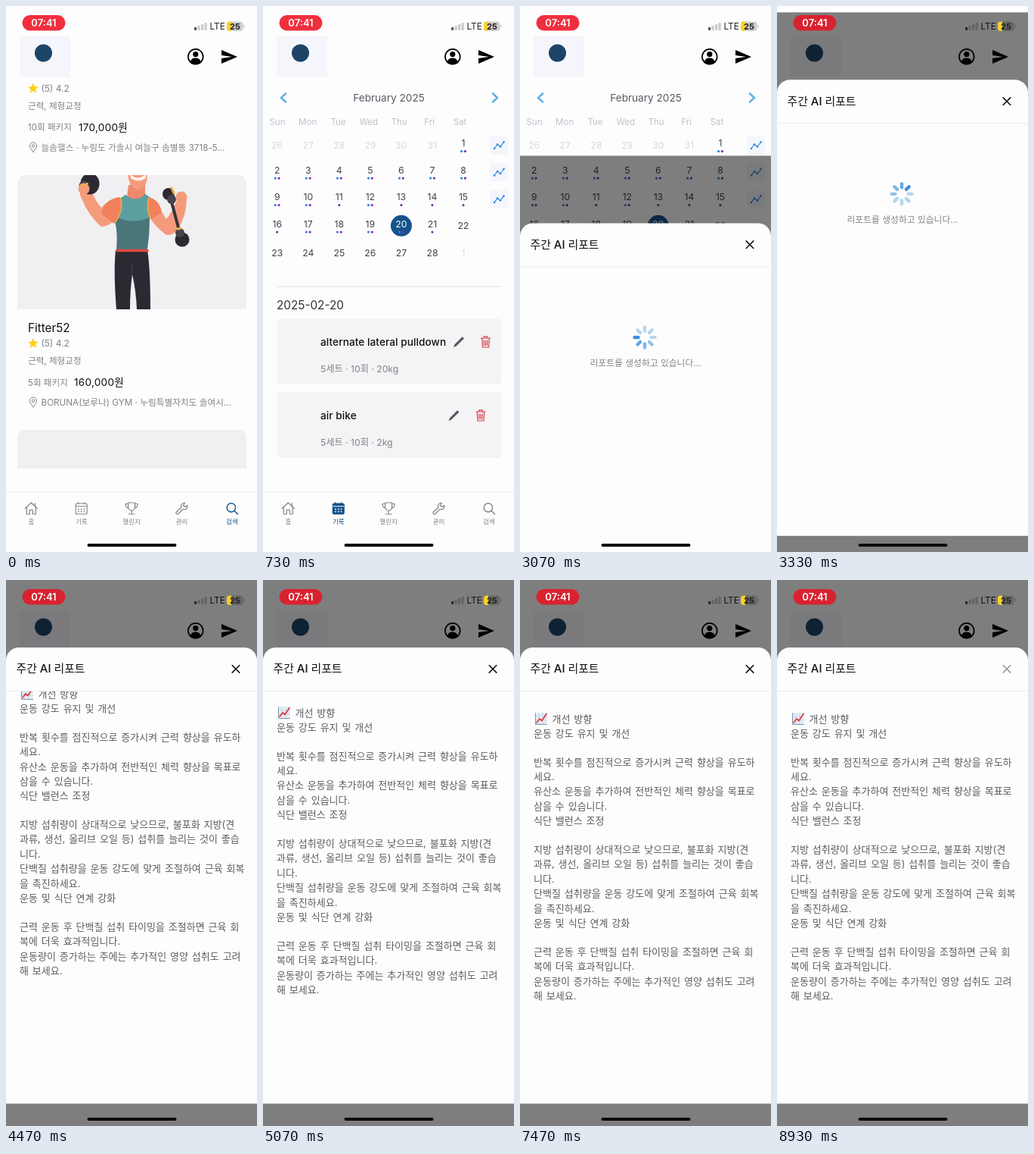
Recreate the animation shown at these times as an HTML page. Size 332 by 720 pixels, loop 9 s.

```html
<!DOCTYPE html>
<html lang="ko">
<head>
<meta charset="utf-8">
<style>
html, body { margin: 0; width: 100%; height: 100%; overflow: hidden; background: #fefdfe; }
svg { display: block; width: 332px; height: 720px; }
text { font-family: Inter, "Noto Sans CJK KR", "Noto Sans CJK", sans-serif; white-space: pre; }
.line { fill: none; stroke-linecap: round; stroke-linejoin: round; }
</style>
</head>
<body>
<svg id="stage" viewBox="0 0 332 720"></svg>
<script>
const stage = document.getElementById('stage');
const BLACK = '#111', GREY = '#828286', NAVY = '#14538c', BLUE = '#2b86d9', PURPLE = '#7b32a8';

// Text is placed by the vertical centre of its capitals.
const text = (x, cy, size, str, fill = BLACK, more = '') =>
  `<text x="${x}" y="${(cy + size * 0.36).toFixed(2)}" font-size="${size}" fill="${fill}" ${more}>${str}</text>`;
const mid = (x, cy, size, str, fill, more = '') => text(x, cy, size, str, fill, `text-anchor="middle" ${more}`);
const rect = (x, y, w, h, fill, r = 0) => `<rect x="${x}" y="${y}" width="${w}" height="${h}" rx="${r}" fill="${fill}"/>`;
const dot = (x, y, r, fill) => `<circle cx="${x}" cy="${y}" r="${r}" fill="${fill}"/>`;
const shape = (d, fill) => `<path d="${d}" fill="${fill}"/>`;
const line = (d, stroke, w = 1) => `<path class="line" d="${d}" stroke="${stroke}" stroke-width="${w}"/>`;
const at = (x, y, body) => `<g transform="translate(${x} ${y})">${body}</g>`;
const group = (id, body) => `<g id="${id}">${body}</g>`;
// Rectangle with only its top corners rounded.
const topRounded = (x, y, w, h, r, fill) =>
  shape(`M${x} ${y + h}V${y + r}a${r} ${r} 0 0 1 ${r} ${-r}h${w - 2 * r}a${r} ${r} 0 0 1 ${r} ${r}V${y + h}z`, fill);

function header() {
  const bars = [0, 1, 2, 3].map(i => rect(249 + i * 4.5, 28 - i * 2, 3.2, 4 + i * 2, i ? '#cbcacc' : '#555', 0.8)).join('');
  return bars + text(269.5, 27, 11.8, 'LTE', '#222') +
    rect(292, 20.5, 21.5, 12.5, '#cfcdca', 4) + rect(314.3, 24.5, 1.4, 4.5, '#cfcdca', 0.7) +
    rect(18, 40, 67, 54, '#f5f6fb', 2) + dot(49.5, 62, 11.5, '#1d4467') +
    `<circle cx="250.8" cy="66.8" r="9.9" fill="none" stroke="#000" stroke-width="1.7"/>` +
    dot(250.8, 63.6, 3.6, '#000') + shape('M244 73.5q1-5 6.8-5t6.8 5q-2.5 3-6.8 3t-6.8-3z', '#000') +
    shape('M285 58L306 67L285 76L285 69L299 67L285 65z', '#000');
}

const pin = line('M0 6C-3 2-4.6.4-4.6-2a4.6 4.6 0 0 1 9.2 0C4.6.4 3 2 0 6z', GREY) +
  `<circle cy="-2" r="1.7" fill="none" stroke="${GREY}"/>`;
const star = shape('M0-7L2-2.2 7-2 3.1 1.4 4.4 6.2 0 3.5-4.4 6.2-3.1 1.4-7-2-2-2.2z', '#fbd018');

function trainerInfo(y, pack, price, priceX, place) {
  return at(36, y, star) + text(46.5, y, 12, '(5) 4.2', GREY) +
    text(29, y + 23.3, 11.6, '근력, 체형교정', GREY) +
    text(29, y + 51.7, 11.6, pack, GREY) + text(priceX, y + 51.7, 13.6, price, BLACK, 'letter-spacing=".25"') +
    at(36, y + 78, pin) + text(46.5, y + 78.5, 11.7, place, GREY);
}

function athlete() {
  const skin = '#f59b7c', dark = '#2d2932', light = '#48434d', sleeve = '#f2805c', gold = '#e9b23f';
  return shape('M145 322H187Q191 345 191 400H173Q172 375 167 354 164 375 164 400H146Q142 350 145 322z', dark) +
    line('M167 340L166 352', light, 1.2) +
    shape('M98 241L112 241Q116 254 126 266Q134 256 150 252L152 270Q142 290 126 291Q108 276 98 249z', skin) +
    shape('M187 253Q203 256 205 270L212 281Q221 270 226 256L238 250Q241 270 229 292Q222 303 212 302Q196 290 188 276z', skin) +
    `<ellipse cx="111" cy="234.5" rx="12.5" ry="14" fill="${dark}"/>` + dot(103, 237, 6.5, light) +
    dot(103, 241, 7.5, skin) + line('M99 237L108 234', gold, 2) +
    shape('M162 236H184V252Q173 262 160 252z', '#ee8a6c') +
    shape('M161 221H187Q187 240 176 242Q163 242 161 221z', skin) +
    shape('M164 222Q174 231 185 222V227Q175 234 165 227z', '#fff3ef') +
    shape('M158 249Q172 261 184 248L191 253Q187 266 190 282Q190 302 187 321H146Q148 298 144 284Q155 269 150 255z', '#4a757b') +
    shape('M158 249Q172 261 184 248L191 253Q186 266 190 279Q168 288 148 279Q155 266 150 255z', '#5c9fa1') +
    shape('M151 252Q130 254 126 274L143 287Q156 268 151 252z', sleeve) +
    shape('M189 252Q204 256 206 273L191 281Q184 266 189 252z', sleeve) +
    line('M151 253Q157 268 144 286', gold, 1.5) + line('M189 253Q185 266 191 280', gold, 1.5) +
    line('M147 322.5H187', '#e2483d', 3.5) +
    line('M217 251L232 307', '#37333d', 4) + dot(215, 248, 8, dark) + dot(219, 255, 6, light) +
    dot(233, 308, 9.5, dark) + dot(230, 299, 6, light) + line('M219 240L222 247', gold, 3) +
    line('M227 294L231 293', gold, 3) + dot(232, 252, 7.5, skin);
}

function searchPage() {
  return trainerInfo(108.5, '10회 패키지', '170,000원', 96, '늘솜헬스 · 누림도 가솔시 여늘구 솜별동 3718-5...') +
    topRounded(15, 223, 303, 177, 10, '#f0eff2') +
    `<g clip-path="url(#photo)">${athlete()}</g>` +
    text(29, 424, 15.3, 'Fitter52') +
    trainerInfo(444.7, '5회 패키지', '160,000원', 90, 'BORUNA(보루나) GYM · 누림특별자치도 솔여시...') +
    topRounded(15, 559, 303, 51, 10, '#f0eff2');
}

function monthGrid() {
  const single = [11, 13, 14, 15, 16, 21];
  let out = '';
  for (let i = 0; i < 35; i++) {
    const day = i - 5, x = 18.7 + (i % 7) * 41.05, y = 183.3 + Math.floor(i / 7) * 35.5;
    const inside = day > 0 && day < 29, marked = inside && day < 22, today = day === 20;
    const label = day < 1 ? day + 31 : day > 28 ? day - 28 : day;
    if (today) out += dot(x, y, 14, NAVY);
    out += mid(x, y - (marked ? 2.4 : 0), 12.2, label, today ? '#fff' : inside ? '#3c4046' : '#d6d8dc');
    if (marked && single.includes(day)) out += dot(x, y + 8.3, 1.6, PURPLE);
    else if (marked) out += dot(x - 2.4, y + 8.3, 1.6, BLUE) + dot(x + 2.4, y + 8.3, 1.6, PURPLE);
  }
  return out;
}

const pencil = shape('M-7 7L-5.6 3.4 4.6-6.8 7-4.6-3.4 5.6z', '#57575b');
const trash = line('M-6-5H6M-2.3-5V-7.2H2.3V-5M-4.8-4.6L-4 7H4L4.8-4.6M0-2V4.5M-2.3-2L-2 4.5M2.3-2L2 4.5', '#d23a45', 1.15);

function exercise(y, name, sets, iconX) {
  return rect(18.5, y, 296.5, 87, '#f4f3f6', 5) +
    text(76, y + 31, 13.6, name, BLACK, 'font-weight="500" letter-spacing=".08"') +
    text(76, y + 67, 12.2, sets, GREY) + at(iconX, y + 31, pencil) + at(iconX + 35.5, y + 31, trash);
}

function recordPage() {
  const days = ['Sun', 'Mon', 'Tue', 'Wed', 'Thu', 'Fri', 'Sat'];
  const trend = rect(-12, -12, 24, 24, '#f3f6fc', 4) + line('M-6 4.5L-2-1 2 2 6.5-4', BLUE, 1.2) +
    [[-6, 4.5], [-2, -1], [2, 2], [6.5, -4]].map(p => dot(...p, 1.3, BLUE)).join('');
  return line('M30 115.5L24 121L30 126.5', '#62b2e4', 2.6) + line('M304 115.5L310 121L304 126.5', '#62b2e4', 2.6) +
    mid(166.5, 121, 13.6, 'February 2025', '#555a61') +
    days.map((d, i) => mid(19 + i * 40.25, 152.5, 11.6, d, '#bcc3cc')).join('') +
    monthGrid() + [183.5, 219, 254.5].map(y => at(312, y, trend)).join('') +
    rect(18, 369.5, 297, 1, '#dededf') + text(18, 394, 15.3, '2025-02-20', '#333') +
    exercise(412, 'alternate lateral pulldown', '5세트 · 10회 · 20kg', 259) +
    exercise(509, 'air bike', '5세트 · 10회 · 2kg', 252.5);
}

function calendarIcon(c, filled) {
  const marks = filled ? '#fff' : c;
  const dots = [-3.8, 0, 3.8].map(x => dot(x, 1, 0.9, marks) + dot(x, 4.2, 0.9, marks)).join('');
  return `<rect x="-7.5" y="-6.5" width="15" height="14" rx="2" fill="${filled ? c : 'none'}" stroke="${c}" stroke-width="1.1"/>` +
    line('M-7-2.8H7', marks, 1.1) + line('M-4-8V-6M4-8V-6', c, 1.2) + dots;
}

function tabBar(active) {
  const icons = [
    c => line('M-8 0L0-7.5 8 0M-6-1.5V7.5H-2V2H2V7.5H6V-1.5M5-3V-7', c, 1.2),
    c => calendarIcon(c, active === 1),
    c => line('M-4.5-7.5H4.5V-2Q4 2.5 0 3Q-4 2.5-4.5-2zM-4.5-6H-8Q-8-.5-4-.5M4.5-6H8Q8-.5 4-.5M0 3V7.5M-4 7.5H4', c, 1.2),
    c => line('M-7.5 5L-.5-1.5Q-2-7 4-7.5L2-4 4-2 7.5-4Q7.5 2.5 1.5 1L-5 7.5Q-8 8-7.5 5z', c, 1.2),
    c => `<circle cx="-1" cy="-1" r="5.7" fill="none" stroke="${c}" stroke-width="1.4"/>` + line('M3.3 3.3L7.5 7.5', c, 1.5)
  ];
  return rect(0, 640.5, 332, 79.5, '#fefdfe') + rect(0, 640.5, 332, 1, '#eeedef') +
    ['홈', '기록', '챌린지', '관리', '검색'].map((name, i) => {
      const c = i === active ? NAVY : GREY, x = 33.3 + i * 66.4;
      return at(x, 662.5, icons[i](c)) + mid(x, 679.7, 8.5, name, c);
    }).join('');
}

function reportBody() {
  const blocks = [
    [202.5, '운동 강도 유지 및 개선'],
    [240, '반복 횟수를 점진적으로 증가시켜 근력 향상을 유도하', '세요.', '유산소 운동을 추가하여 전반적인 체력 향상을 목표로', '삼을 수 있습니다.', '식단 밸런스 조정'],
    [355.3, '지방 섭취량이 상대적으로 낮으므로, 불포화 지방(견', '과류, 생선, 올리브 오일 등) 섭취를 늘리는 것이 좋습', '니다.', '단백질 섭취량을 운동 강도에 맞게 조절하여 근육 회복', '을 촉진하세요.', '운동 및 식단 연계 강화'],
    [490.2, '근력 운동 후 단백질 섭취 타이밍을 조절하면 근육 회', '복에 더욱 효과적입니다.', '운동량이 증가하는 주에는 추가적인 영양 섭취도 고려', '해 보세요.']
  ];
  const write = (x, y, s) => text(x, y, 13, s, '#5c5c60', 'word-spacing="1.25"');
  const chart = rect(20, 175, 16, 16, '#e4edf4', 1) +
    line('M20.5 180H35.5M20.5 185H35.5M25 175.5V190M30 175.5V190', '#bfd0de', 0.7) +
    line('M20.5 175.5V190.5H35.5', '#7d97ab', 1) + line('M22 188L26 183 29 185.5 35 176.5', '#dc3e45', 1.8);
  return chart + write(42.5, 183, '개선 방향') +
    blocks.map(([y, ...rows]) => rows.map((s, i) => write(18, y + i * 19.4, s)).join('')).join('');
}

function sheet() {
  let spokes = '';
  for (let i = 0; i < 8; i++) spokes += `<path class="line spoke" d="M0-8.5V-13.5" stroke-width="4.4" transform="rotate(${i * 45})"/>`;
  return rect(0, 0, 332, 720, 'rgba(0,0,0,.5)') +
    topRounded(0, 89, 332, 601.5, 17, '#fefdfe') +
    text(13.5, 117, 14.9, '주간 AI 리포트', BLACK, 'font-weight="500"') +
    group('close', line('M299.2 112.5L308.8 122.1M308.8 112.5L299.2 122.1', '#111', 1.6)) +
    rect(0, 146, 332, 1, '#ececee') +
    group('loading', at(165, 239.5, spokes) + mid(166, 273, 11.8, '리포트를 생성하고 있습니다...', GREY)) +
    `<g clip-path="url(#body)">${group('report', reportBody())}</g>`;
}

stage.innerHTML = `<defs>
    <clipPath id="photo"><rect x="15" y="223" width="303" height="177"/></clipPath>
    <clipPath id="body"><rect y="147" width="332" height="543"/></clipPath>
  </defs>` + rect(0, 0, 332, 720, '#fefdfe') + header() +
  group('search', searchPage() + tabBar(4)) + group('record', recordPage() + tabBar(1)) + group('modal', sheet()) +
  `<rect id="pill" x="21.5" y="12" width="57" height="20.5" rx="10.2"/>` +
  mid(50, 22.2, 13, '07:41', '#fff', 'font-weight="600"') +
  shape('M298 20.5H296Q292 20.5 292 24.5V29Q292 33 296 33H298z', '#fbd126') +
  mid(303, 26.8, 11, '25', '#222', 'font-weight="700"') +
  rect(107.5, 709, 118, 4, '#0c0c0e', 2);

const el = id => document.getElementById(id);
const show = (id, on) => el(id).setAttribute('display', on ? 'inline' : 'none');
const move = (id, y) => el(id).setAttribute('transform', `translate(0 ${y.toFixed(2)})`);
const clamp = v => Math.max(0, Math.min(1, v));
const spokes = [...document.querySelectorAll('.spoke')];
const SWITCH = 400, OPEN = 2900, READY = 3930, PULL = 4000, RELEASE = 4250, REST = 5720, PRESS = 8850;

// Overscroll: dragged up, then settling back.
function scroll(t) {
  if (t < PULL || t > REST) return 0;
  const settle = u => -33 * ((REST - u) / 1250) ** 2.167;
  const p = clamp((t - PULL) / (RELEASE - PULL));
  return t < RELEASE ? settle(RELEASE) * p * p * (3 - 2 * p) : settle(t);
}

function draw(t) {
  const w = Math.max(0, t - OPEN) * 0.015;
  const drop = t > 3700 ? 0 : 720 * (1 + w) * Math.exp(-w);
  show('search', t < SWITCH);
  show('record', t >= SWITCH);
  show('modal', t >= OPEN);
  show('loading', t < READY);
  show('report', t >= READY);
  move('modal', drop);
  move('report', scroll(t));
  el('pill').setAttribute('fill', drop < 20 ? '#d8232f' : '#f02f3d');
  el('close').setAttribute('opacity', 1 - 0.58 * clamp((t - PRESS) / 80));
  const head = Math.floor((t - 3330) / 110) + 1;
  spokes.forEach((s, i) => {
    const age = (((head - i) % 8) + 8) % 8;
    s.setAttribute('stroke', ['#3d8fdd', '#62a8e4', '#7db8e8', '#94c5ea'][age] || '#b5d6ec');
  });
}

function tick(now) {
  draw(now % 9000);
  requestAnimationFrame(tick);
}
draw(0);
requestAnimationFrame(tick);
</script>
</body>
</html>
```
